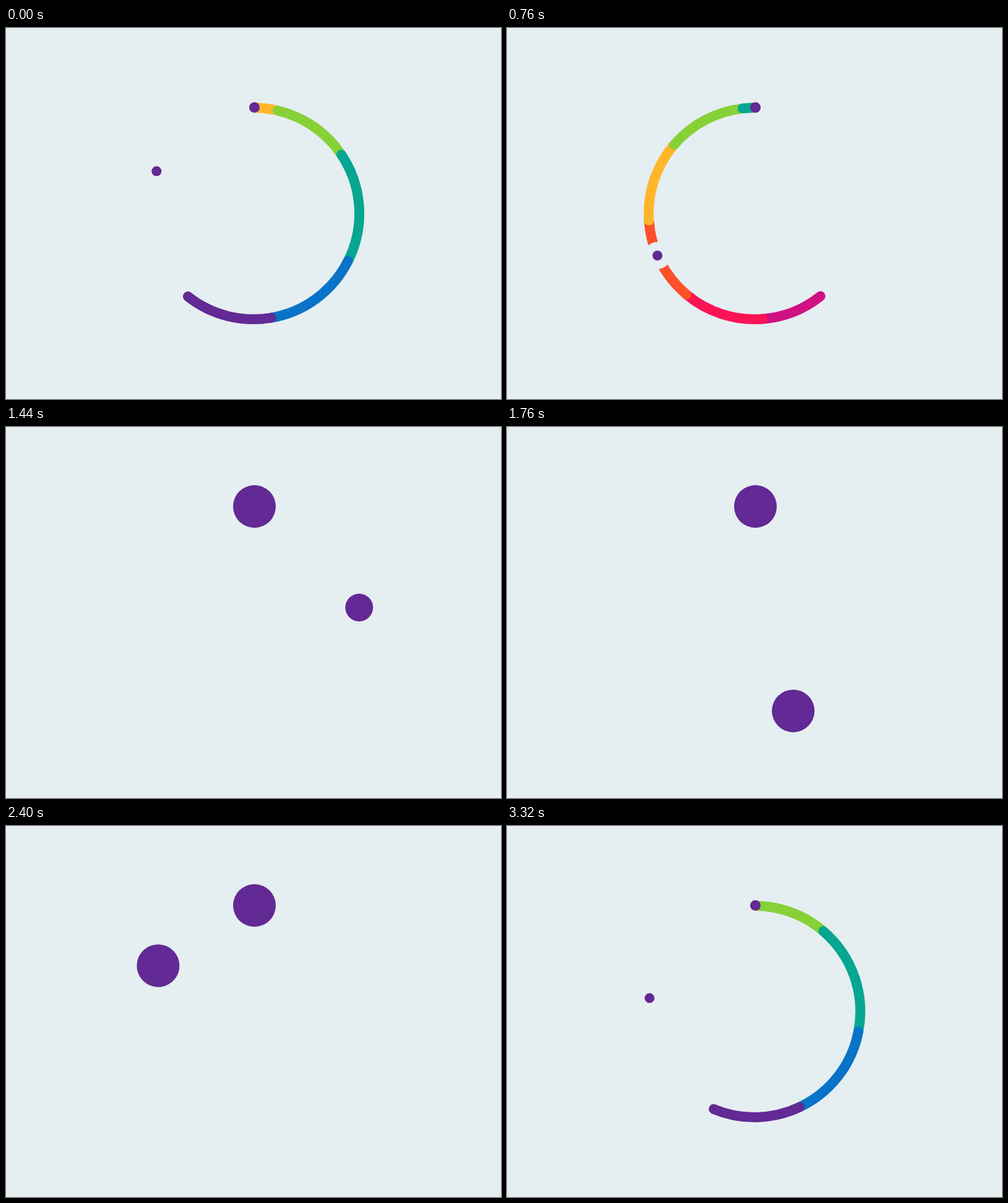
Recreate the animation shown at these times as an HTML page. Size 800 by 600 pixels, loop 3.36 s.

```html
<!DOCTYPE html>
<html lang="en">
<head>
<meta charset="utf-8">
<title>Rainbow ring</title>
<style>
  html, body { margin: 0; width: 100%; height: 100%; overflow: hidden; background: #e5eef1; }
  svg { display: block; width: 800px; height: 600px; }
  path { fill: none; stroke-width: 16; stroke-linecap: round; }
</style>
</head>
<body>
<svg viewBox="0 0 800 600">
  <g id="trail"></g>
  <circle id="halo" fill="#e5eef1"/>
  <circle id="orbiter" fill="#632994"/>
  <circle id="anchor" cx="401.5" cy="128.5" fill="#632994"/>
</svg>
<script>
const LOOP = 3360;
const RING = 171;
const TRAIL_START = 2803;
const TRAIL_SPEED = 360 / 920;
const ORBIT_START = 2815;
const SMALL = 8, BIG = 34.5;

// Colour and the angle behind the head at which each band ends
const bands = [
  ['#632994', 48], ['#0873c8', 101.7], ['#06a692', 162.2], ['#87d137', 205.2],
  ['#ffb729', 249.5], ['#ff5029', 295.8], ['#fb1455', 340.2], ['#cf1183', 374.3]
];

// Orbit keys: time since launch, degrees, degrees per ms
const orbit = [
  [0, 0, 0.95], [185, 138.5, 0.55], [525, 285, 0.41], [985, 471.6, 0.405],
  [1665, 732.5, 0.26], [2225, 860, 0.23], [2785, 983.1, 0.207], [LOOP, 1080, 0.1]
];

const byId = id => document.getElementById(id);
const since = (time, start) => (time - start + LOOP) % LOOP;
const clamp = (v, lo, hi) => Math.min(hi, Math.max(lo, v));

function smooth(time, start, duration) {
  const u = clamp((time - start) / duration, 0, 1);
  return u * u * (3 - 2 * u);
}

function pointAt(degrees) {
  const a = degrees * Math.PI / 180;
  return [400 + RING * Math.sin(a), 300 - RING * Math.cos(a)];
}

function orbitAngle(time) {
  let i = 1;
  while (i < orbit.length - 1 && time > orbit[i][0]) i++;
  const [t0, a0, v0] = orbit[i - 1];
  const [t1, a1, v1] = orbit[i];
  const d = t1 - t0, u = (time - t0) / d, w = 1 - u;
  return a0 * w * w * (1 + 2 * u) + a1 * u * u * (3 - 2 * u)
    + d * u * w * (v0 * w - v1 * u);
}

function arc(from, to) {
  const a = clamp(from, 0.5, 360.5), b = clamp(to, 0.5, 360.5);
  if (b <= a) return '';
  return `M${pointAt(a)}A${RING} ${RING} 0 0 1 ${pointAt(b)}`;
}

function setCircle(el, x, y, r) {
  el.setAttribute('cx', x);
  el.setAttribute('cy', y);
  el.setAttribute('r', r);
}

const trail = byId('trail');
const paths = bands.map(([color]) => {
  const path = document.createElementNS('http://www.w3.org/2000/svg', 'path');
  path.setAttribute('stroke', color);
  trail.prepend(path);
  return path;
});

function draw(time) {
  const head = since(time, TRAIL_START) * TRAIL_SPEED;
  paths.forEach((path, i) => {
    const front = i ? bands[i - 1][1] : 0;
    path.setAttribute('d', arc(head - bands[i][1], head - front));
  });

  const [x, y] = pointAt(orbitAngle(since(time, ORBIT_START)));
  const grown = time < ORBIT_START ? smooth(time, 1250, 360) : 0;
  const r = SMALL + (BIG - SMALL) * grown;
  setCircle(byId('halo'), x, y, r + 14);
  setCircle(byId('orbiter'), x, y, r);

  const swell = smooth(time, 1053, 360) - smooth(time, 2803, 360);
  byId('anchor').setAttribute('r', 8.5 + (BIG - 8.5) * swell);
}

const start = performance.now();
function tick() {
  draw((performance.now() - start) % LOOP);
  requestAnimationFrame(tick);
}
draw(0);
requestAnimationFrame(tick);
</script>
</body>
</html>
```
